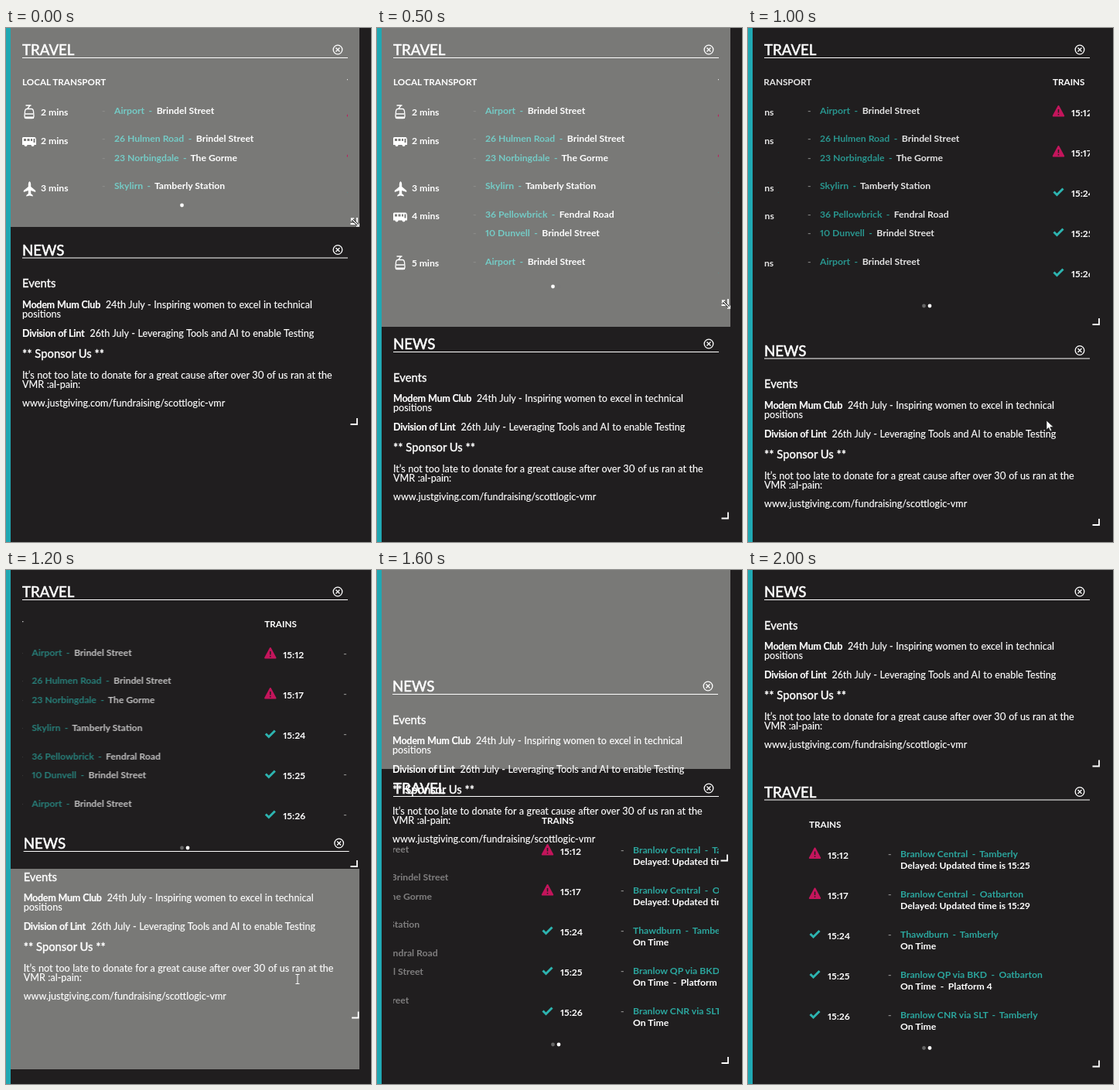
Animation of 472 by 664 pixels, one loop 2.1 s. Source, as an HTML page:

```html
<!DOCTYPE html>
<html lang="en">
<head>
<meta charset="utf-8">
<title>Dashboard</title>
<style>
  html, body { margin: 0; width: 100%; height: 100%; overflow: hidden; background: #201e1f; }
  svg { display: block; width: 472px; height: 664px; fill: #fff;
    font-family: Lato, "Open Sans", sans-serif; font-variant-numeric: proportional-nums; }
  .title { font-size: 18.7px; stroke: #fff; stroke-width: .55px; }
  .label { font-size: 11.7px; font-weight: 700; }
  .row { font-size: 12.2px; font-weight: 700; }
  .news { font-size: 12.6px; word-spacing: .3px; stroke: #fff; stroke-width: .15px; }
  .lead { font-weight: 700; letter-spacing: -.3px; }
  .sub { font-size: 14.8px; stroke: #fff; stroke-width: .4px; }
  .teal { fill: var(--teal); }
  .faint { fill: #8a8a88; }
  .line { fill: none; stroke: #fff; stroke-width: 1.3px; }
  .thin { stroke-width: 1px; }
  .grip { stroke-width: 1.8px; }
</style>
</head>
<body>
<svg id="stage" viewBox="0 0 472 664"></svg>
<script>
const LOOP = 2100, STEP = 100, SMALL = 257, LARGE = 387, SLOT = 258.5, LOW_SLOT = 388.5;

const text = (x, y, cls, s) => `<text x="${x}" y="${y}" class="${cls}">${s}</text>`;
const span = (s, cls = '', dx = 0) => `<tspan dx="${dx}" class="${cls}">${s}</tspan>`;
const pair = (a, b, clsA, clsB) => span(a, clsA) + span('-', clsA, 5.5) + span(b, clsB, 5.5);

const header = name => text(21, 35, 'title', name) + `
  <path class="line thin" d="M21 38.5H442"/>
  <circle class="line" cx="429" cy="28" r="5.8"/>
  <path class="line" d="M426.5 25.5l5 5m0-5l-5 5"/>`;
const handle = id => `<path id="${id}" class="line grip" d="M445.5 0H454V-8"/>`;

const icons = {
  tram: `<path class="line" d="M25.5 -9.5h7M31 -9.5l-3 4M27 -5h6q2 0 2.5 3l.5 6q0 3-2 3h-8q-2 0-2-3l.5-6q.5-3 2.5-3zM25 1.5h10"/>
    <path d="M24 5h12v2.5H24z"/>`,
  bus: `<path fill-rule="evenodd" d="M22 -5h15q1.5 0 2 3v7H21v-9zM23 -3v3h3v-3zm4.5 0v3h3v-3zm4.5 0v3h2v-3zm3.5 0v5h2v-5z"/>
    <circle cx="25.5" cy="5" r="2"/><circle cx="34.5" cy="5" r="2"/>`,
  plane: `<path d="M30.5 -9q1.7 1 1.7 4v3l6 5v2l-6-2v4l2.5 2v1.5l-4.2-1-4.2 1V9l2.5-2V3l-6 2V3l6-5v-3q0-3 1.7-4z"/>`,
  late: `<path fill="#c4155c" stroke="#c4155c" stroke-width="2" stroke-linejoin="round" d="M28.5 -7l6.7 12.5H21.8z"/>
    <path stroke="#201e1f" stroke-width="1.5" d="M28.5 -3v4.5m0 1.5v1.5"/>`,
  ok: `<path fill="none" stroke="#2db4b0" stroke-width="3" d="M22.5 -.5l4 4 8-8"/>`
};
const icon = (name, y) => `<g transform="translate(0 ${y})">${icons[name]}</g>`;

const services = [
  ['tram', 2, 110.5, ['Airport', 'Brindel Street']],
  ['bus', 2, 147, ['26 Hulmen Road', 'Brindel Street'], ['23 Norbingdale', 'The Gorme']],
  ['plane', 3, 208, ['Skylirn', 'Tamberly Station']],
  ['bus', 4, 244.5, ['36 Pellowbrick', 'Fendral Road'], ['10 Dunvell', 'Brindel Street']],
  ['tram', 5, 305.5, ['Airport', 'Brindel Street']]
];
const trains = [
  ['late', '15:12', ['Branlow Central', 'Tamberly'], 'Delayed: Updated time is 15:25'],
  ['late', '15:17', ['Branlow Central', 'Oatbarton'], 'Delayed: Updated time is 15:29'],
  ['ok', '15:24', ['Thawdburn', 'Tamberly'], 'On Time'],
  ['ok', '15:25', ['Branlow QP via BKD', 'Oatbarton'], pair('On Time', 'Platform 4')],
  ['ok', '15:26', ['Branlow CNR via SLT', 'Tamberly'], 'On Time']
];

const serviceRow = ([kind, mins, y, ...routes]) =>
  icon(kind, y - 1) + text(45, y + 2.5, 'row', mins + ' mins') +
  routes.map(([line, stop], i) =>
    text(124, y + i * 24.5, 'row faint', '-') +
    text(140, y + i * 24.5, 'row', pair(line, stop, 'teal'))).join('');

const trainRow = ([kind, time, [from, to], status], i) => {
  const y = 112 + i * 52;
  return icon(kind, y - 4) + text(45, y + 2, 'row', time) +
    text(123, y, 'row faint', '-') +
    text(139, y, 'row', pair(from, to, 'teal', 'teal')) +
    text(139, y + 15, 'row', status);
};

const stage = document.getElementById('stage');
stage.innerHTML = `
  <clipPath id="view"><rect id="viewBox" x="21" y="50" width="421"/></clipPath>
  <rect width="472" height="664" fill="#201e1f"/>
  <rect id="slot" x="6" width="451" fill="#797977"/>
  <rect width="6" height="664" fill="#20a8b3"/>
  <g id="travel">
    ${header('TRAVEL')}
    <g clip-path="url(#view)"><g id="slides">
      <g id="local">${text(21, 74, 'label', 'LOCAL TRANSPORT')}${services.map(serviceRow).join('')}</g>
      <g transform="translate(420 0)">${text(21, 74, 'label', 'TRAINS')}${trains.map(trainRow).join('')}</g>
    </g></g>
    <circle id="dotA" cx="227.5" r="2.4"/><circle id="dotB" cx="235" r="2.4"/>
    ${handle('travelGrip')}
  </g>
  <g id="news">
    ${header('NEWS')}
    ${text(21, 76.5, 'sub', 'Events')}
    ${text(21, 103, 'news lead', 'Modem Mum Club')}
    ${text(129, 103, 'news', '24th July - Inspiring women to excel in technical')}
    ${text(21, 115, 'news', 'positions')}
    ${text(21, 140, 'news lead', 'Division of Lint')}
    ${text(108.5, 140, 'news', '26th July - Leveraging Tools and AI to enable Testing')}
    ${text(21, 167, 'sub', '** Sponsor Us **')}
    ${text(21, 194, 'news', 'It’s not too late to donate for a great cause after over 30 of us ran at the')}
    ${text(21, 206, 'news', 'VMR :al-pain:')}
    ${text(21, 230, 'news', 'www.justgiving.com/fundraising/scottlogic-vmr')}
    ${handle('newsGrip')}
  </g>
  <g id="resize"><path stroke="#111" stroke-width="3" d="M-5 -5L5 5"/>
    <path class="line" d="M-5 -1.5V-5h3.5M-5 -5L5 5M1.5 5H5V1.5"/></g>
  <path id="arrow" stroke="#222" stroke-width=".7" d="M0 0v12l2.8-2.6 2 4.4 2-.9-2-4.3H9z"/>
  <path id="beam" class="line thin" d="M-2.5 -6h5M0 -6V6M-2.5 6h5"/>`;

const el = id => document.getElementById(id);
const set = (id, attrs) => { for (const k in attrs) el(id).setAttribute(k, attrs[k]); };
const move = (id, x, y) => set(id, { transform: `translate(${x} ${y})` });
const show = (id, on) => set(id, { visibility: on ? 'visible' : 'hidden' });

// Linear interpolation through [time, value] points.
function track(t, ...keys) {
  if (t <= keys[0][0]) return keys[0][1];
  for (let i = 1; i < keys.length; i++) {
    const [t0, a] = keys[i - 1], [t1, b] = keys[i];
    if (t < t1) return a + (b - a) * (t - t0) / (t1 - t0);
  }
  return keys[keys.length - 1][1];
}

function draw(t) {
  const height = track(t, [0, SMALL], [300, 332], [500, 362], [600, 370], [700, 371], [900, LARGE]);
  const slide = track(t, [600, 0], [700, -3], [800, -13], [900, -28], [1000, -47], [1100, -76],
    [1400, -168], [1600, -228], [2000, -362]);
  const newsX = track(t, [1100, 0], [1400, 5], [1600, -1], [1900, 0]);
  const newsY = track(t, [300, SLOT], [400, 335], [500, 380], [600, LOW_SLOT], [1100, LOW_SLOT],
    [1400, 198], [1500, 155], [1600, 122], [1900, 0]);
  const travelY = track(t, [1400, 0], [1500, 135], [1600, 254], [1700, SLOT]);

  const resizing = t < 800, dragging = t >= 1200 && t < 1900;
  show('slot', resizing || dragging);
  if (resizing) set('slot', { y: 0, height: t < 300 ? SMALL : 386 });
  else set('slot', t < 1500 ? { y: 386, height: 259 } : { y: 0, height: SMALL });
  stage.style.setProperty('--teal', resizing ? '#74cbc6' : '#2ba69e');

  move('travel', 0, travelY);
  move('slides', slide, 0);
  set('local', { opacity: Math.max(0, 1 + slide / 400) });
  set('viewBox', { height: height - 84 });
  move('travelGrip', 0, height - 4);
  set('dotA', { cy: height - 28, fill: t < 700 ? '#fff' : '#666' });
  set('dotB', { cy: height - 28, fill: t < 700 ? '#777' : '#fff' });

  move('news', newsX, newsY);
  move('newsGrip', 0, 253.5);

  show('resize', t < 700);
  move('resize', 451.5, t <= 300 ? 251 : height - 5);
  show('arrow', t >= 700 && t < 1200);
  move('arrow', track(t, [700, 429], [1000, 386], [1200, 377]), track(t, [700, 364], [1000, 507], [1200, 522]));
  show('beam', t >= 1200 && t < 1500);
  move('beam', 377, 528.5);
}

const start = performance.now();
function tick() {
  const t = (performance.now() - start) % LOOP;
  draw(Math.floor(t / STEP) * STEP);
  requestAnimationFrame(tick);
}
draw(0);
requestAnimationFrame(tick);
</script>
</body>
</html>
```
